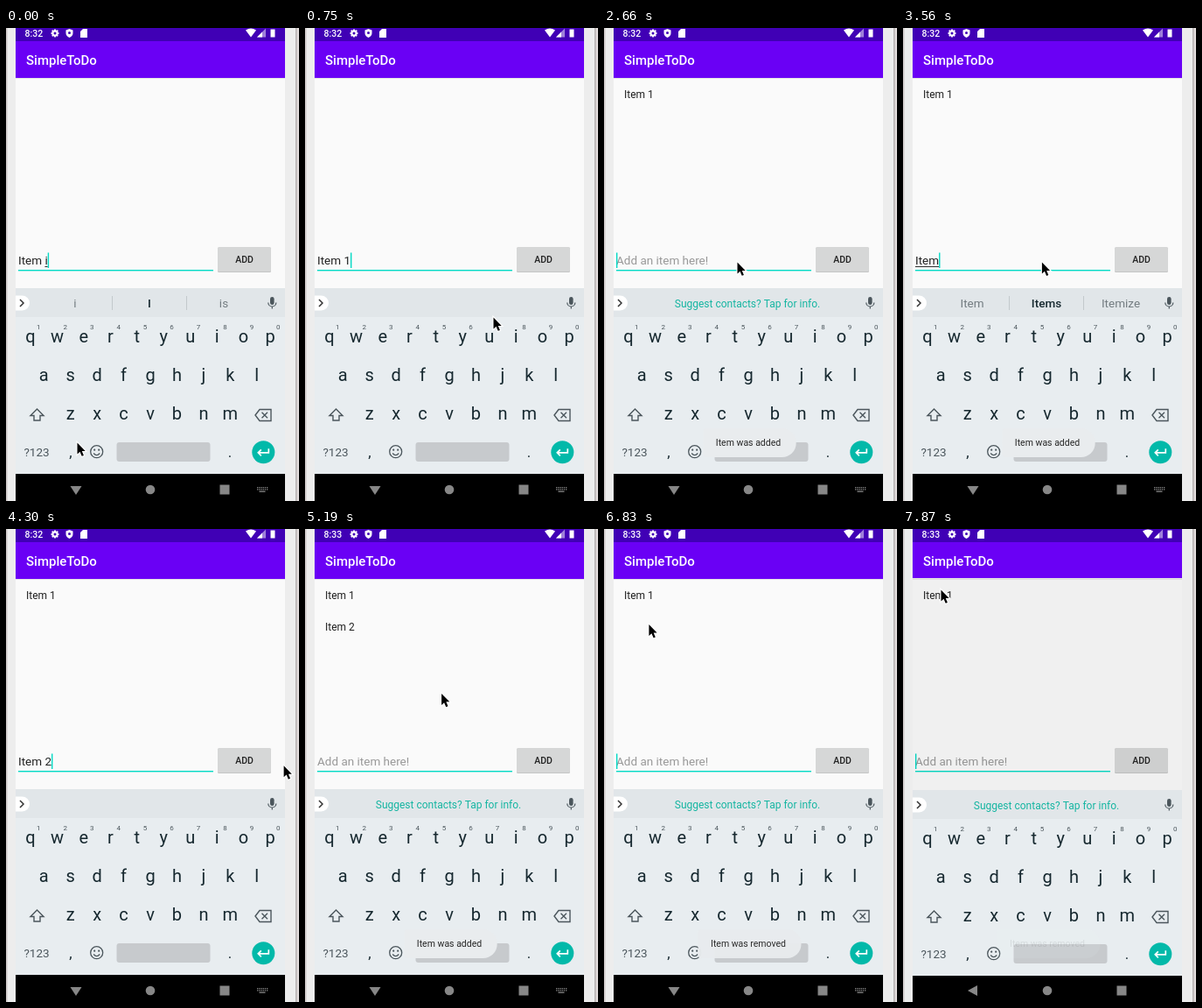
Animation, 335 px wide and 540 px high, one loop 8 s. Source, as an HTML page with a canvas:

```html
<!DOCTYPE html>
<html lang="en">
<head>
<meta charset="utf-8">
<style>
html, body { margin: 0; width: 100%; height: 100%; overflow: hidden; background: #ededed; }
canvas { display: block; width: 335px; height: 540px; }
</style>
</head>
<body>
<canvas id="stage"></canvas>
<script>
const canvas = document.getElementById('stage');
const ctx = canvas.getContext('2d');
const ratio = window.devicePixelRatio || 1;
canvas.width = 335 * ratio;
canvas.height = 540 * ratio;

const LOOP = 8000, TICK = 148.3, BLINK = 440, LEAVE = 7870;
const TEAL = '#03dac5', INK = '#16282f', ICON = '#4b565c', GRAY = '#878787';
const CONTACTS = 'Suggest contacts? Tap for info.';

const story = [
  { start: 0, typed: 'Item i', hint: ['i', 'I', 'is'], items: 0 },
  { start: 150, typed: 'Item ', hint: [], items: 0 },
  { start: 600, typed: 'Item 1', hint: [], items: 0 },
  { start: 1790, typed: '', hint: [CONTACTS], items: 1 },
  { start: 3110, typed: 'I', hint: [CONTACTS], items: 1 },
  { start: 3410, typed: 'Item', hint: ['Item', 'Items', 'Itemize'], items: 1 },
  { start: 4000, typed: 'Item 2', hint: [], items: 1 },
  { start: 4740, typed: '', hint: [CONTACTS], items: 2 },
  { start: 6680, typed: '', hint: [CONTACTS], items: 1 },
];
const toasts = [
  { label: 'Item was added', from: 1970, to: 4000 },
  { label: 'Item was added', from: 4940, to: 6640 },
  { label: 'Item was removed', from: 6640, to: 7890 },
];
const stops = [
  { x: 81, y: 473, arrive: 0, leave: 150 },
  { x: 215, y: 330, arrive: 750, leave: 1040 },
  { x: 254, y: 256, arrive: 1490, leave: 1790 },
  { x: 152, y: 267, arrive: 2220, leave: 3560 },
  { x: 322, y: 270, arrive: 4150, leave: 4300 },
  { x: 263, y: 268, arrive: 4600, leave: 4890 },
  { x: 51, y: 109, arrive: 5940, leave: 6830 },
  { x: 43, y: 69, arrive: 7420, leave: LOOP },
];

const clamp = v => Math.max(0, Math.min(1, v));

function pointerAt(t) {
  const i = stops.findIndex(stop => t < stop.leave);
  const to = stops[i];
  if (t >= to.arrive) return [to.x, to.y];
  const from = stops[i - 1];
  const u = (t - from.leave) / (to.arrive - from.leave), e = u * (2 - u);
  return [from.x + (to.x - from.x) * e, from.y + (to.y - from.y) * e];
}

function rect(x, y, w, h, color) {
  ctx.fillStyle = color;
  ctx.fillRect(x, y, w, h);
}

function round(x, y, w, h, r, color) {
  ctx.fillStyle = color;
  ctx.beginPath();
  ctx.roundRect(x, y, w, h, r);
  ctx.fill();
}

function disc(x, y, r, color) {
  ctx.fillStyle = color;
  ctx.beginPath();
  ctx.arc(x, y, r, 0, 7);
  ctx.fill();
}

function text(str, x, y, size, color, align = 'left', weight = 400) {
  ctx.font = `${weight} ${size}px Roboto, sans-serif`;
  ctx.textAlign = align;
  ctx.fillStyle = color;
  ctx.fillText(str, x, y);
}

function shape(d, x, y, color, line = 0) {
  ctx.save();
  ctx.translate(x, y);
  ctx.fillStyle = ctx.strokeStyle = color;
  ctx.lineWidth = line;
  if (line) ctx.stroke(new Path2D(d));
  else ctx.fill(new Path2D(d));
  ctx.restore();
}

function drawStatus(t) {
  const bar = '#4000b5';
  rect(11, 0, 308, 15, bar);
  text(t < 4600 ? '8:32' : '8:33', 21.5, 10, 10.5, '#fff', 'left', 500);
  for (let a = 0; a < 6; a += Math.PI / 4) {
    disc(56 + 3.6 * Math.cos(a), 6 + 3.6 * Math.sin(a), 1.1, '#fff');
  }
  disc(56, 6, 3.6, '#fff');
  disc(56, 6, 1.5, bar);
  shape('M0-5 4-3.5V0Q4 3 0 5Q-4 3-4 0V-3.5Z', 72.5, 6, '#fff');
  disc(72.5, 5.6, 1.5, bar);
  shape('M-1-5H4V5H-4V-2Z', 89, 6, '#fff');
  shape('M0 5-6-3Q0-7 6-3Z', 280, 5.5, '#fff');
  shape('M5-5V5H-5Z', 292, 5.5, '#9f80da');
  shape('M1-1V5H-5Z', 292, 5.5, '#fff');
  rect(302.5, 1.5, 5, 9, '#fff');
}

function drawField(state, t) {
  const { typed } = state;
  text(typed || 'Add an item here!', 14, 270, 13.5, typed ? '#222' : '#999');
  const end = typed ? 14 + ctx.measureText(typed).width : 14;
  const word = typed.match(/[a-z]+$/i);
  if (word) {
    const w = ctx.measureText(word[0]).width;
    rect(end - w, 272, w, 1, '#333');
  }
  rect(14, 276, 223, 1.4, TEAL);
  const shown = Math.floor((t - state.start) / BLINK) % 2 === 0;
  if (shown) rect(end, 256.5, 1.4, 17.5, TEAL);

  const pressed = stops.some(s => s.x > 250 && s.x < 300 && t >= s.leave - 150 && t < s.leave);
  round(242, 250.5, 61, 28.5, 1.5, '#c4c5c5');
  round(242, 250, 61, 28, 1.5, pressed ? '#bcbcbc' : '#d6d7d7');
  text('ADD', 272.5, 268, 10.5, '#222', 'center', 500);
}

function drawApp(state, t, leaving) {
  rect(11, 57, 308, 241, '#fafafa');
  rect(11, 57, 308, 1, '#e4e4e4');
  rect(11, 15, 308, leaving ? 41 : 42, '#6a00f5');
  drawStatus(t);
  text('SimpleToDo', 23, 42, 15, '#fff', 'left', 500);
  for (let i = 0; i < state.items; i++) {
    text(`Item ${i + 1}`, 23, 79.5 + 36 * i, 12, '#212121');
  }
  drawField(state, t);
  if (leaving) rect(11, 56, 308, 242, 'rgba(0,0,0,.04)');
}

function drawHints(hint) {
  rect(11, 297, 308, 34, '#e1e6e9');
  round(11, 305.5, 16, 17, [0, 8.5, 8.5, 0], '#fff');
  shape('M-2-4 2 0-2 4', 18, 314, '#333', 1.5);
  round(302, 307, 4.6, 9, 2.3, ICON);
  shape('M-4.5 0A4.5 4.5 0 0 0 4.5 0M0 4.5V7', 304.3, 313.5, ICON, 1.2);
  if (hint.length === 1) text(hint[0], 164, 318.5, 12, '#14b5a1', 'center');
  if (hint.length < 3) return;
  hint.forEach((word, i) => {
    const main = i === 1;
    text(word, 79 + 85 * i, 319, 13.5, main ? INK : '#737c81', 'center', main ? 500 : 400);
    if (i) rect(36 + 85 * i, 306, 1, 16, '#c3c9cc');
  });
}

function drawKeys() {
  rect(11, 330, 308, 181, '#e8edf0');
  ['qwertyuiop', 'asdfghjkl', 'zxcvbnm'].forEach((keys, row) => [...keys].forEach((key, i) => {
    const x = 165 + (i - (keys.length - 1) / 2) * 30.45;
    text(key, x, 359 + 44 * row, 20, INK, 'center');
    if (row === 0) text((i + 1) % 10, x + 9.3, 344, 8, ICON, 'center');
  }));
  shape('M0-6.5 7.5 1H3.5V6.5H-3.5V1H-7.5Z', 35.5, 441.5, ICON, 1.4);
  shape('M-9 0-4-6.5H9V6.5H-4ZM-1.5-3.2 5 3.2M5-3.2-1.5 3.2', 294, 442, ICON, 1.4);
  text('?123', 35, 489, 13.5, ICON, 'center');
  text(',', 74, 490, 17, INK, 'center');
  text('.', 256, 490, 17, INK, 'center');
  shape('M7 0A7 7 0 1 1-7 0A7 7 0 1 1 7 0M-3.5 1.8Q0 6 3.5 1.8', 103.7, 483.7, ICON, 1.3);
  for (const dx of [-2.5, 2.5]) disc(103.7 + dx, 481.7, 1.1, ICON);
  round(126.5, 473, 107, 22, 3, '#c7cacd');
  disc(294.3, 484.3, 13, '#02b9a9');
  shape('M6-4V.5H-6M-2.5-3-6 .5-2.5 4', 294.3, 484.3, '#fff', 1.7);
}

function drawNav(leaving) {
  const top = leaving ? 510 : 509;
  rect(11, top, 308, 540 - top, '#000');
  shape(leaving ? 'M5-6V6L-6 0Z' : 'M-6.5-5H6.5L0 5Z', 80, leaving ? 527 : 528, GRAY);
  disc(165, 527, 5.3, GRAY);
  rect(244.5, 521.5, 11, 11, GRAY);
  if (leaving) return;
  for (let x = 287; x < 299; x += 2.2) {
    for (let y = 524; y < 528; y += 2.2) rect(x, y, 1.3, 1.3, GRAY);
  }
  rect(289.5, 528.5, 7, 1.3, GRAY);
}

function drawToast({ label, from, to }, t) {
  ctx.save();
  ctx.globalAlpha = clamp(Math.min(t - from, to - t) / 200);
  ctx.font = '10.5px Roboto, sans-serif';
  const w = ctx.measureText(label).width + 32;
  round(166.5 - w / 2, 457, w, 33, [4, 16, 16, 4], '#e9ecee');
  text(label, 165, 477, 10.5, '#252525', 'center');
  ctx.restore();
}

function drawPointer(t) {
  const [x, y] = pointerAt(t);
  const arrow = 'M0 0V13L3 10.2 5.200 15.300 7.400 14.400 5.300 9.400H9.200Z';
  shape(arrow, x + .5, y + .5, '#fff', 2.2);
  shape(arrow, x + .5, y + .5, '#000');
}

function draw(t) {
  const leaving = t >= LEAVE;
  const state = story.filter(step => step.start <= t).pop();
  ctx.setTransform(ratio, 0, 0, ratio, 0, 0);
  rect(0, 0, 335, 540, '#ededed');
  rect(0, 0, 1.5, 540, '#cbc5c5');
  rect(331, 0, 4, 540, '#e2dcdc');
  rect(331, 0, 1.5, 540, '#b5b0b0');
  drawApp(state, t, leaving);
  ctx.save();
  if (leaving) ctx.translate(0, 1);
  drawHints(state.hint);
  drawKeys();
  ctx.restore();
  drawNav(leaving);
  for (const toast of toasts) drawToast(toast, t);
  drawPointer(t);
}

// The screen refreshes in coarse, even ticks.
function frame() {
  const t = performance.now() % LOOP;
  draw(Math.min(LOOP - 1, Math.floor((t + 10) / TICK) * TICK + 12));
  requestAnimationFrame(frame);
}
frame();
</script>
</body>
</html>
```
